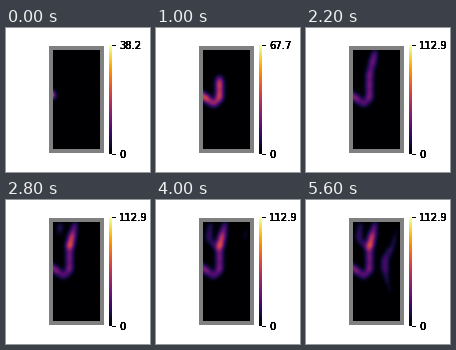
Write a matplotlib script that moves like this. It is 144 by 144 pixels and loops after 8000 ms.

```python
import numpy as np
import matplotlib.pyplot as plt
from matplotlib.animation import FuncAnimation
from matplotlib.patches import Rectangle

SIZE, DPI = 144, 72
STEP, FRAMES = 200, 40

# Tank interior in stage pixels: left, top, width, height
LEFT, TOP, WIDTH, HEIGHT = 47, 22, 47, 99

SPEED = 8.5    # pixels travelled per step
CLUMP = 10.5   # pixels between dense spots along a track

# Scale maximum and the step from which it holds
PEAKS = [(0, 38.2), (1, 67.7), (11, 112.9)]

xs, ys = np.meshgrid(LEFT + np.arange(WIDTH), TOP + np.arange(HEIGHT))


def track(start, *keys):
    """Lay one spot per pixel along x, y, level keys at constant speed."""
    keys = np.array(keys, float)
    lengths = np.hypot(*np.diff(keys[:, :2], axis=0).T)
    stops = np.r_[0, np.cumsum(lengths)]
    s = np.arange(0, stops[-1] + 1)
    x, y, level = (np.interp(s, stops, column) for column in keys.T)
    spread = 1.3 + 1.6 * np.minimum(1, level / 18)
    level *= 1 + 0.2 * np.cos(2 * np.pi * s / CLUMP)
    strength = level / (spread * np.sqrt(2 * np.pi))
    return np.column_stack([start + s / SPEED, x, y, strength, spread])


SPOTS = np.vstack([
    track(-0.8, (41, 64, 42), (50, 70, 36), (57, 76, 17), (63, 70, 34),
          (63, 46, 33), (69, 22, 12)),
    track(10, (68, 26, 8), (63, 46, 45)),
    track(13, (54, 24, 14), (52, 38, 18), (62, 50, 8)),
    track(19, (90, 30, 4), (86, 46, 12), (79, 57, 20), (78, 65, 27),
          (80, 78, 10), (84, 92, 3)),
])


def dose(frame):
    total = np.zeros(xs.shape)
    for time, x, y, strength, spread in SPOTS:
        if time <= frame:
            r2 = (xs - x) ** 2 + (ys - y) ** 2
            total += strength * np.exp(-r2 / (2 * spread ** 2))
    return total


def peak(frame):
    return [value for step, value in PEAKS if step <= frame][-1]


def pixel_axes(x, y, w, h):
    ax = fig.add_axes([x / SIZE, 1 - (y + h) / SIZE, w / SIZE, h / SIZE])
    ax.axis("off")
    return ax


plt.rcParams["font.family"] = "DejaVu Sans"
fig = plt.figure(figsize=(SIZE / DPI, SIZE / DPI), dpi=DPI, facecolor="white")

stage = pixel_axes(0, 0, SIZE, SIZE)
stage.set_xlim(0, SIZE)
stage.set_ylim(SIZE, 0)
stage.add_patch(Rectangle((43, 18), 55, 107, fc="#808080", lw=0, aa=False))
for y in (17, 126):
    stage.add_patch(Rectangle((106, y), 4, 1, fc="black", lw=0, aa=False))

bar = pixel_axes(103, 17, 3, 109)
bar.imshow(np.linspace(1, 0, 109)[:, None], cmap="inferno", aspect="auto",
           interpolation="nearest")

tank = pixel_axes(LEFT, TOP, WIDTH, HEIGHT)
heat = tank.imshow(dose(0), cmap="inferno", vmin=0, vmax=peak(0),
                   aspect="auto", interpolation="nearest")


def label(y, text):
    # Stacked copies darken the soft edges of the glyphs
    return [stage.text(113, y, text, size=10, va="center_baseline")
            for _ in range(8)]


label(126, "0")
top_label = label(17, "38.2")


def update(frame):
    heat.set_data(dose(frame))
    heat.set_clim(0, peak(frame))
    for copy in top_label:
        copy.set_text(f"{peak(frame):.1f}")
    return heat, *top_label


anim = FuncAnimation(fig, update, frames=FRAMES, interval=STEP,
                     repeat=True, repeat_delay=0, blit=False)
plt.show()
```
